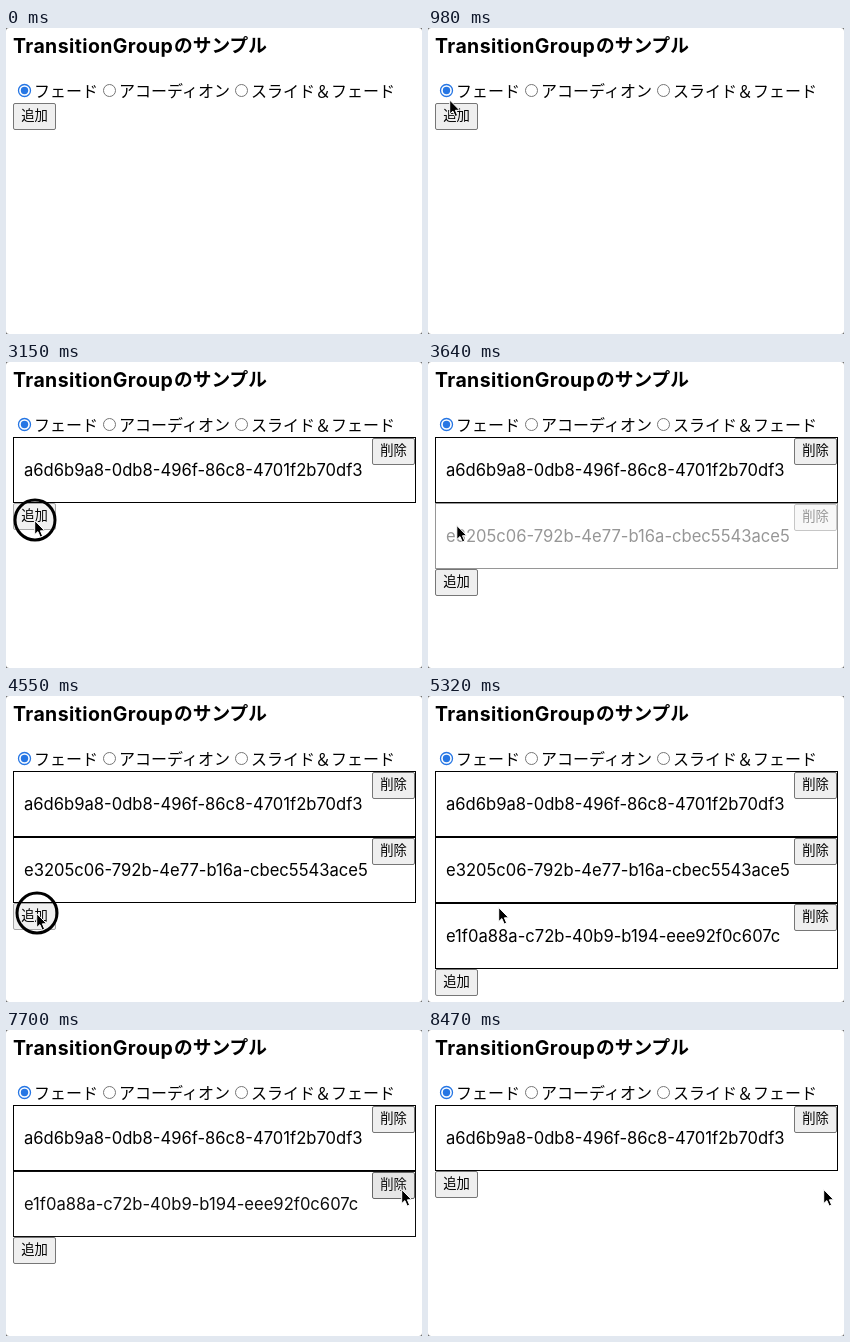
An HTML page that plays this animation: 416 px wide and 306 px high, repeating every 8.54 s.

```html
<!DOCTYPE html>
<html lang="ja">
<head>
<meta charset="utf-8">
<title>TransitionGroup</title>
<style>
  html, body { margin: 0; width: 100%; height: 100%; overflow: hidden; background: #666; }
  #stage {
    position: absolute; left: 0; top: 0; width: 416px; height: 306px;
    overflow: hidden; background: #fff; border-radius: 3px; color: #000;
    font: 16px/24px "Noto Sans CJK JP", "Noto Sans CJK", sans-serif;
  }
  #stage * { box-sizing: border-box; white-space: nowrap; }
  h3, h3 span, label, .item, .item p, .btn, svg { position: absolute; margin: 0; }
  h3, .item p { font-family: Inter, sans-serif; }
  h3 { left: 7px; top: 4px; font-size: 19.5px; line-height: 28px; letter-spacing: .4px; }
  h3 span {
    left: 161px; top: 0; font-size: 18.72px; letter-spacing: 0;
    font-family: Inter, "Noto Sans CJK JP", "Noto Sans CJK", sans-serif;
  }
  label { top: 50px; }
  .item { left: 7px; width: 403px; height: 66px; border: 1px solid #000; }
  .item p { left: 10px; top: 20px; font-size: 16.6px; }
  .btn {
    width: 43px; height: 27px; border: 1px solid #767676; border-radius: 2px;
    background: #efefef; font-size: 13.333px; line-height: 21px; text-align: center;
  }
  .btn.hover { background: #e5e5e5; border-color: #5f5f5f; }
  .btn.active { background: #f0f0f0; border-color: #a6a6a6; }
  .item .btn { right: 0; top: 0; }
  #add { left: 7px; }
  svg { left: 0; top: 0; }
</style>
</head>
<body>
<div id="stage">
  <h3>TransitionGroup<span>のサンプル</span></h3>
  <label style="left:28px">フェード</label>
  <label style="left:113px">アコーディオン</label>
  <label style="left:245px">スライド＆フェード</label>
  <div id="add" class="btn">追加</div>
  <svg id="overlay" width="416" height="306" fill="none">
    <g stroke="#767676">
      <circle cx="18.5" cy="62.5" r="6" stroke="#2676e4" stroke-width="1.3"/>
      <circle cx="18.5" cy="62.5" r="3.7" fill="#2676e4" stroke="none"/>
      <circle cx="103.5" cy="62.5" r="6"/>
      <circle cx="235.5" cy="62.5" r="6"/>
    </g>
    <g id="pointer">
      <circle id="ring" r="20" stroke="#000" stroke-width="3"/>
      <path d="M-.3 .5V14.6L2.9 11.6L5.2 17L7.6 16L5.4 10.8H9.7Z" fill="#000" stroke="#fff" stroke-width="1" stroke-linejoin="round"/>
    </g>
  </svg>
</div>
<script>
const LOOP = 8540, STEP = 70, FADE = 500;
const TOP = 75, ROW = 66;
const $ = id => document.getElementById(id);

// enter / leave: fade start, gone: removal from the list
const items = [
  { id: 'a6d6b9a8-0db8-496f-86c8-4701f2b70df3', add: 1820, enter: 1845 },
  { id: 'e3205c06-792b-4e77-b16a-cbec5543ace5', add: 3500, enter: 3515, leave: 6335, gone: 6930 },
  { id: 'e1f0a88a-c72b-40b9-b194-eee92f0c607c', add: 4600, enter: 4600, leave: 7665, gone: 8190 }
];
const presses = [[1750, 1820], [3150, 3500], [4480, 4600], [6090, 6300], [7490, 7660]];

// time, x, y
const path = [
  [280, 157, 247], [560, 95, 165], [910, 17, 69], [1050, 27, 74], [1260, 27, 74],
  [1400, 29, 88], [1820, 29, 88], [1960, 35, 89], [2380, 35, 89], [2800, 29, 158],
  [3600, 29, 158], [3990, 30, 206], [4340, 31, 217], [5250, 31, 217],
  [5320, 71, 211], [5600, 240, 174], [5950, 396, 159]
];

for (const item of items) {
  const box = item.box = document.createElement('div');
  box.className = 'item';
  const text = document.createElement('p');
  text.textContent = item.id;
  item.btn = document.createElement('div');
  item.btn.className = 'btn';
  item.btn.textContent = '削除';
  box.append(text, item.btn);
  $('stage').insertBefore(box, $('overlay'));
}

// CSS "ease": cubic-bezier(.25, .1, .25, 1)
function ease(p) {
  if (p <= 0) return 0;
  if (p >= 1) return 1;
  const curve = (a, b, u) => 3 * a * u * (1 - u) ** 2 + 3 * b * u * u * (1 - u) + u ** 3;
  let lo = 0, hi = 1;
  for (let i = 0; i < 20; i++) {
    const mid = (lo + hi) / 2;
    if (curve(.25, .25, mid) < p) lo = mid; else hi = mid;
  }
  return curve(.1, 1, lo);
}

function pointerAt(t) {
  const next = path.findIndex(k => k[0] > t);
  if (next < 0) return path[path.length - 1].slice(1);
  if (next === 0) return path[0].slice(1);
  const [t0, x0, y0] = path[next - 1], [t1, x1, y1] = path[next];
  const p = (t - t0) / (t1 - t0);
  return [x0 + (x1 - x0) * p, y0 + (y1 - y0) * p];
}

function opacityAt(item, t) {
  if (item.leave && t >= item.leave) return Math.max(.035, 1 - ease((t - item.leave) / FADE));
  return ease((t - item.enter) / FADE);
}

function render(t) {
  const [x, y] = pointerAt(t);
  const shown = t >= path[0][0];
  const pressed = presses.some(([from, to]) => t >= from && t < to);

  const setButton = (btn, left, top) => {
    const over = shown && x >= left && x < left + 43 && y >= top && y < top + 27;
    btn.classList.toggle('hover', over);
    btn.classList.toggle('active', over && pressed);
  };

  let top = TOP;
  for (const item of items) {
    const live = t >= item.add && !(t >= item.gone);
    item.box.style.display = live ? '' : 'none';
    if (!live) continue;
    item.box.style.top = top + 'px';
    item.box.style.opacity = opacityAt(item, t);
    setButton(item.btn, 366, top + 1);
    top += ROW;
  }
  $('add').style.top = top + 'px';
  setButton($('add'), 7, top);

  $('pointer').style.display = shown ? '' : 'none';
  $('pointer').setAttribute('transform', `translate(${x} ${y})`);
  $('ring').style.display = pressed ? '' : 'none';
}

const start = performance.now();
function tick() {
  const t = (performance.now() - start) % LOOP;
  render(Math.floor(t / STEP) * STEP);
  requestAnimationFrame(tick);
}
tick();
</script>
</body>
</html>
```
